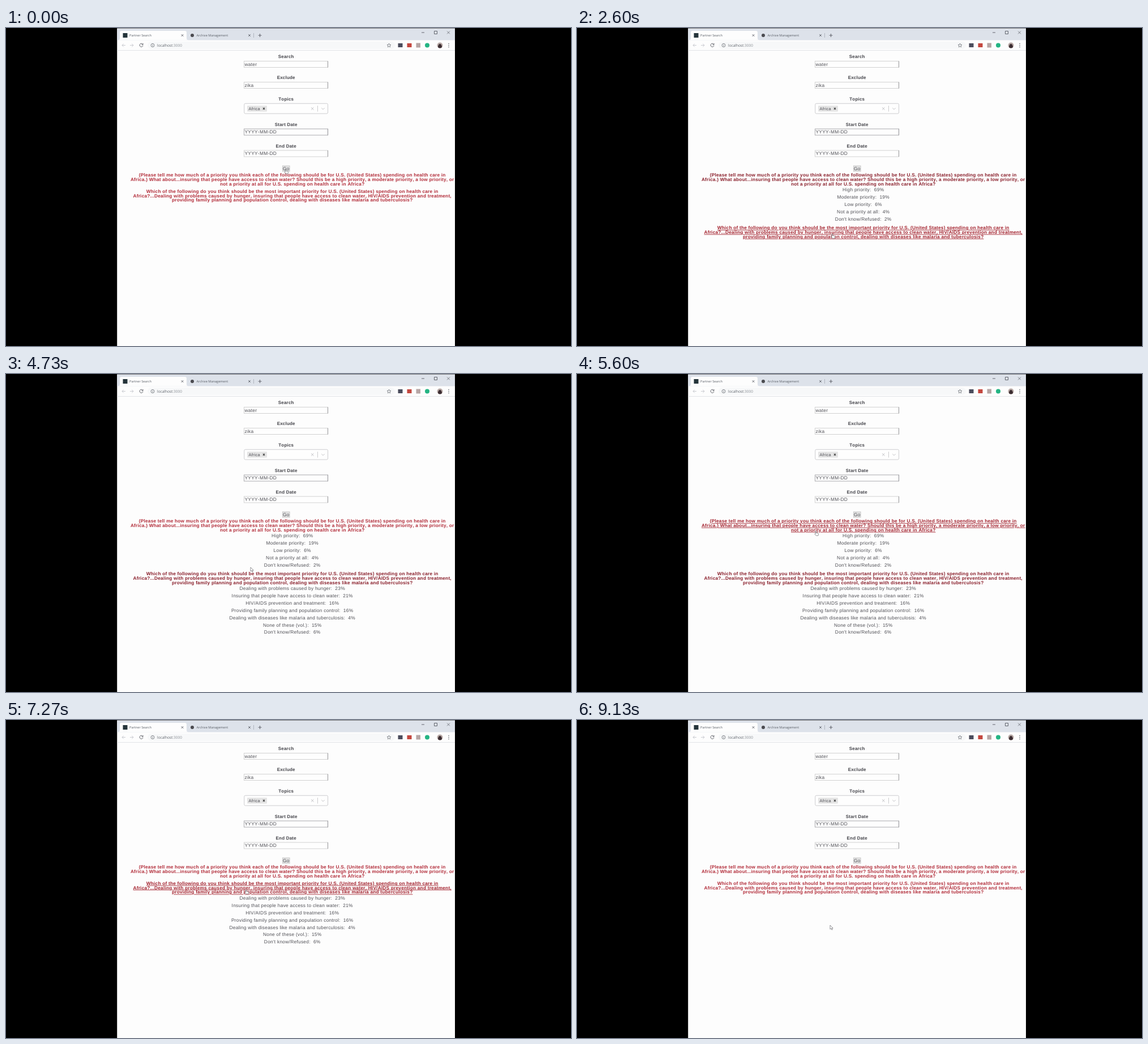
Animation, 998 px wide and 561 px high, one loop 9.16 s. Source, as an HTML page:

```html
<!DOCTYPE html>
<html lang="en">
<head>
<meta charset="utf-8">
<style>
html, body { margin: 0; width: 100%; height: 100%; overflow: hidden; background: #000; }
svg { display: block; width: 998px; height: 561px; }
text { font: 8.4px "Liberation Sans", Arial, sans-serif; letter-spacing: .256px; fill: #505056;
  white-space: pre; text-rendering: geometricPrecision; font-kerning: none; }
.mid { text-anchor: middle; }
.label { font-size: 8px; font-weight: 700; letter-spacing: .2px; fill: #44444a; }
.q { font-size: 8.3px; font-weight: 700; letter-spacing: .207px; fill: inherit; }
.hover .q { text-decoration: underline; text-decoration-thickness: .8px; }
.small { font: 5.65px "Open Sans", sans-serif; letter-spacing: 0; fill: #5b6068; }
.line { fill: none; stroke: #555960; stroke-width: .9; }
</style>
</head>
<body>
<svg id="stage" viewBox="0 0 998 561"></svg>
<script>
const LOOP = 9160, SHIFT = 64.3;

const text = (x, y, s, cls = '', style = '') => `<text x="${x}" y="${y}" class="${cls}" style="${style}">${s}</text>`;
const rect = (x, y, w, h, fill, more = '') => `<rect x="${x}" y="${y}" width="${w}" height="${h}" fill="${fill}" ${more}/>`;
const line = (d, style = '') => `<path class="line" d="${d}" style="${style}"/>`;
const dot = (x, y, r, fill) => `<circle cx="${x}" cy="${y}" r="${r}" fill="${fill}"/>`;
const cross = (x, y, r, style) => line(`M${x - r} ${y - r}l${2 * r} ${2 * r}m0 ${-2 * r}l${-2 * r} ${2 * r}`, style);
const column = (rows, y, step, cls) => rows.map((s, i) => text(505.7, y + i * step, s, 'mid ' + cls)).join('');
const answers = rows => rows.map(([s, n]) => `${s}:\u00a0 ${n}%`);

const first = {
  y: 262,
  lines: [
    '(Please tell me how much of a priority you think each of the following should be for U.S. (United States) spending on health care in',
    'Africa.) What about...insuring that people have access to clean water? Should this be a high priority, a moderate priority, a low priority, or',
    'not a priority at all for U.S. spending on health care in Africa?'],
  answers: answers([['High priority', 69], ['Moderate priority', 19], ['Low priority', 6],
    ['Not a priority at all', 4], ["Don't know/Refused", 2]])
};
const second = {
  y: 290.7,
  lines: [
    'Which of the following do you think should be the most important priority for U.S. (United States) spending on health care in',
    'Africa?...Dealing with problems caused by hunger, insuring that people have access to clean water, HIV/AIDS prevention and treatment,',
    'providing family planning and population control, dealing with diseases like malaria and tuberculosis?'],
  answers: answers([['Dealing with problems caused by hunger', 23],
    ['Insuring that people have access to clean water', 21], ['HIV/AIDS prevention and treatment', 16],
    ['Providing family planning and population control', 16],
    ['Dealing with diseases like malaria and tuberculosis', 4], ['None of these (vol.)', 15], ["Don't know/Refused", 6]])
};

function browser() {
  const faint = 'stroke:#c3c6cb', thin = 'stroke-width:.7';
  return rect(196.2, .7, 596.8, 561, '#fdfdfd') + rect(196.2, .7, 596.8, 20.8, '#dde2ea') +
    '<path d="M198 21.5Q201 21 201 18V8Q201 5 204 5H316Q319 5 319 8V18Q319 21 322 21.5Z" fill="#fdfdfd"/>' +
    rect(206.5, 9, 8, 8, '#25343a') + dot(329, 13, 3, '#4b4b50') +
    text(218, 15, 'Partner Search', 'small') + text(336.5, 15, 'Archive Management', 'small') +
    cross(311.5, 13, 1.8) + cross(430, 13, 1.8) + line('M437.5 9v8', 'stroke:#9da3ad;stroke-width:.7') +
    line('M445.5 13h6m-3-3v6') + line('M734 8h5') + line('M756.5 5.500h5v5h-5z') + cross(781.5, 8, 2.4, thin) +
    rect(250, 24, 437, 13, '#f7f8f9', 'rx="6.5"') +
    line('M211 30.5h-6m2.7-2.7l-2.7 2.7 2.7 2.7M219 30.5h6m-2.7-2.7l2.7 2.7-2.7 2.7', faint) +
    line('M241.4 28.4A3 3 0 1 0 242 31M242 27v2.5h-2.5') +
    line('M256 30.5a3 3 0 1 0 6 0a3 3 0 1 0-6 0M259 30v2.2m0-3.9v.8', thin) +
    text(267, 33, 'localhost<tspan fill="#888c93">:3000</tspan>', 'small', 'font-size:6.5px') +
    line('M676.5 27.2l1 2.2 2.4.3-1.8 1.6.5 2.4-2.1-1.2-2.1 1.2.5-2.4-1.8-1.6 2.4-.3z', thin) +
    rect(692.5, 27, 8, 7, '#4a4c5c') + rect(708.5, 27, 8, 7, '#c4473f') + rect(724.5, 26.5, 7.5, 8, '#b7a6a5') +
    dot(744, 30.5, 4, '#24b483') + dot(766.5, 30.5, 5, '#b9aaa6') +
    '<path d="M763 34a3.5 6 0 1 1 7 0q-3.5 3-7 0" fill="#3b2c30"/>' +
    [27.5, 30.5, 33.5].map(y => dot(782, y, .8, '#555960')).join('') +
    line('M196 39.5H793', 'stroke:#e2e4e8;stroke-width:1');
}

function form() {
  const input = (y, s, edge = '#d2d2d2') => rect(420.5, y, 148, 11, '#fefefe', `stroke="${edge}"`) +
    line(`M568.5 ${y}v11`, 'stroke:#8c8c90') + text(421.5, y + 8.3, s);
  const labels = [['Search', 53], ['Exclude', 90.3], ['Topics', 127.8], ['Start Date', 172.6], ['End Date', 210.6]];
  return labels.map(([s, y]) => text(494.7, y, s, 'mid label')).join('') +
    input(58.5, 'water') + input(95.5, 'zika') +
    input(178, 'YYYY-MM-DD', '#aaaaae') + input(216, 'YYYY-MM-DD') +
    rect(420.8, 133.2, 147.7, 17.8, '#fefefe', 'rx="2" stroke="#c8c8ca" stroke-width=".9"') +
    rect(426, 137, 35, 10.5, '#e5e5e5', 'rx="1"') + text(428.5, 144.8, 'Africa', '', 'font-size:7.4px') +
    cross(455.5, 142.2, 1.6, 'stroke:#333;stroke-width:1.1') + cross(541.3, 142.2, 2.2, 'stroke:#bbbbbf') +
    line('M550.5 137v10.5', 'stroke:#c8c8ca') + line('M557.3 141l2.7 2.7 2.7-2.7', 'stroke:#bbbbbf') +
    rect(488.3, 243, 12.8, 10, '#e3e3e3', 'stroke="#bdbdbd" stroke-width=".7"') + text(494.9, 250.9, 'Go', 'mid');
}

const question = (id, q) => `<g id="${id}">${column(q.lines, q.y, 7.85, 'q')}` +
  `<g id="${id}List">${column(q.answers, q.y + 26.4, 12.85, '')}</g></g>`;

const stage = document.getElementById('stage');
stage.innerHTML = browser() + form() + question('one', first) + question('two', second) +
  `<g id="pointer" stroke="#66666b" stroke-width=".7" fill="#fff">
    <path id="arrow" d="M0 0V7.2L1.8 5.6 3 8.2 4.2 7.7 3.1 5.2H5.2Z"/>
    <path id="hand" d="M-.7.6Q0-.5.7.6V3.2L4 4Q4.8 4.3 4.6 5.3L4 8H.3L-2.2 5Q-2 4.2-.7 4.8Z"/>
  </g>`;
const el = id => document.getElementById(id);

// Pointer tip: time, x, y
const path = [[0, 494, 249], [400, 492, 250], [1000, 463, 276], [1750, 463, 276], [2450, 451, 363], [3700, 450, 363],
  [4730, 432, 341], [5400, 422, 277], [6550, 422, 278], [7200, 424, 299], [8250, 424, 299], [9050, 447, 362], [LOOP, 447, 362]];

function pointerAt(t) {
  const i = path.findIndex(p => p[0] > t), [t0, x0, y0] = path[i - 1], [t1, x1, y1] = path[i];
  const u = (t - t0) / (t1 - t0), k = u * u * (3 - 2 * u);
  return [x0 + (x1 - x0) * k, y0 + (y1 - y0) * k];
}

function paint(id, hover, focus) {
  el(id).setAttribute('class', hover ? 'hover' : '');
  el(id).setAttribute('fill', focus ? '#8a1f2b' : hover ? '#a3212d' : '#b22c39');
}

const show = (id, on) => el(id).style.display = on ? '' : 'none';

function draw(now) {
  const t = now % LOOP, [x, y] = pointerAt(t);
  const openOne = t >= 1200 && t < 5800, openTwo = t >= 2950 && t < 7500;
  const shift = openOne ? SHIFT : 0;
  const overOne = y > 254.5 && y < 280, overTwo = y > 283.5 + shift && y < 309 + shift;
  const overGo = y < 254 && x > 488 && x < 501;
  const hand = overOne || overTwo || overGo;
  show('oneList', openOne);
  show('twoList', openTwo);
  show('hand', hand);
  show('arrow', !hand);
  el('two').setAttribute('transform', `translate(0 ${shift})`);
  paint('one', overOne, t >= 1200 && t < 2950 || t >= 5800 && t < 6200);
  paint('two', overTwo, t >= 2950 && t < 5800 || t >= 7500 && t < 8500);
  el('pointer').setAttribute('transform', `translate(${x} ${y})`);
}

function tick() {
  draw(performance.now());
  requestAnimationFrame(tick);
}
tick();
</script>
</body>
</html>
```
